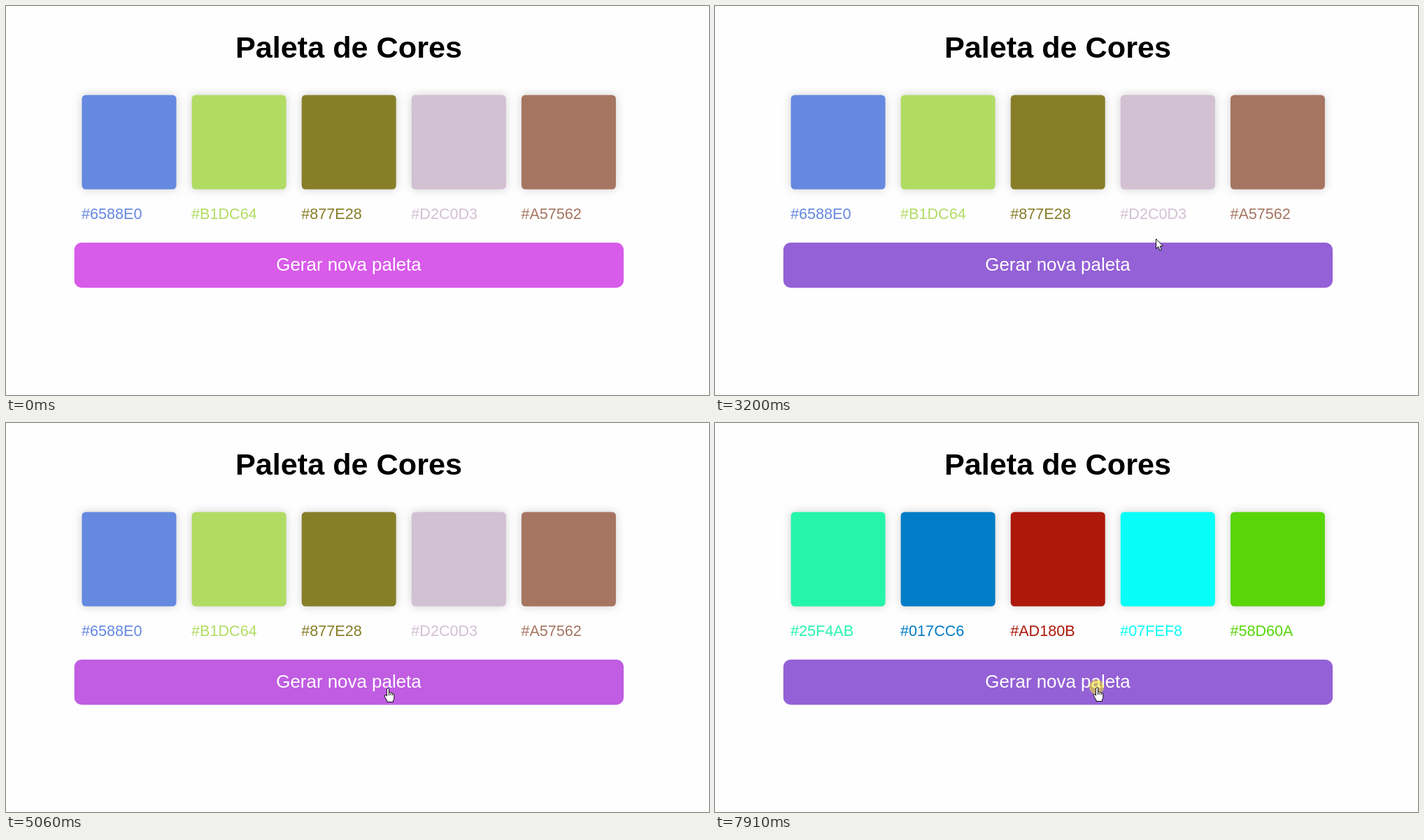
An HTML page for the animation above (8000 ms loop, 1005 px wide and 557 px high).

```html
<!DOCTYPE html>
<html lang="pt-BR">
<head>
<meta charset="utf-8">
<title>Paleta de Cores</title>
<style>
  html, body { margin: 0; width: 100%; height: 100%; overflow: hidden; background: #fefefe; }
  svg { display: block; width: 1005px; height: 557px; font-family: "Liberation Sans", Arial, sans-serif; }
  .cursor { fill: #fff; stroke: #111; stroke-width: 1; stroke-linejoin: round; }
</style>
</head>
<body>
<svg viewBox="0 0 1005 557">
  <defs>
    <filter id="shadow" x="-20%" y="-20%" width="140%" height="140%" color-interpolation-filters="sRGB">
      <feDropShadow dx="0" dy="0" stdDeviation="6.5" flood-color="#000" flood-opacity=".18"/>
    </filter>
  </defs>
  <text x="490" y="74" font-size="43.2" font-weight="bold" text-anchor="middle">Paleta de Cores</text>
  <g id="swatches"></g>
  <rect id="button" x="97.7" y="338.7" width="785.3" height="64.8" rx="10.8"/>
  <text x="490" y="379" font-size="25.92" fill="#fff" text-anchor="middle">Gerar nova paleta</text>
  <circle id="click" cx="545.5" cy="378" r="10.5" fill="#ff0" fill-opacity=".47"/>
  <g id="pointer" class="cursor">
    <path id="arrow" d="M.5 .5V14.5L3.7 11.6L6 17L8.4 16L6.1 10.9H10.4Z"/>
    <g id="hand">
      <path d="M-1.5 12V2Q0 -1 1.5 2V7Q3 5.5 4 7.5Q5.5 6.5 6.5 8.5Q8.5 7.5 8.8 10V15Q8.8 17 7.5 18V20.5H-1V19L-4.6 13Q-5.5 10 -3.2 10.5Z"/>
      <path d="M1.5 7V11M4 7.5V11M6.5 8.5V11" fill="none"/>
    </g>
  </g>
</svg>
<script>
const LOOP = 8000, FADE = 400, APPEAR = 1110, CLICK = 7050, NEW_PALETTE = 7250, NEXT_CLICK = 7910;
const BUTTON_TOP = 339, PINK = [216, 91, 233], PURPLE = [148, 97, 214];
const palettes = [
  ['#6588E0', '#B1DC64', '#877E28', '#D2C0D3', '#A57562'],
  ['#25F4AB', '#017CC6', '#AD180B', '#07FEF8', '#58D60A']
];
// Pointer strokes: the time each begins and ends, and where it leads; it rests in between
const strokes = [
  { from: 1110, to: 1180, x: 994, y: 548 },
  { from: 1390, to: 1920, x: 827, y: 471 },
  { from: 2310, to: 2380, x: 806, y: 453 },
  { from: 2380, to: 3200, x: 630, y: 333 },
  { from: 3200, to: 3780, x: 546, y: 390 },
  { from: 3780, to: 3890, x: 544, y: 441 },
  { from: 3890, to: 4240, x: 545, y: 483 },
  { from: 4570, to: 5060, x: 546, y: 379 },
  { from: 5540, to: 5950, x: 544, y: 446 },
  { from: 6170, to: 6350, x: 545, y: 403 },
  { from: 6350, to: 6650, x: 546, y: 378 }
];
const hovers = [[2700, 3810], [4970, 5690], [6350, LOOP]];

const $ = id => document.getElementById(id);
const clamp = k => Math.min(1, Math.max(0, k));
const mix = (a, b, k) => a + (b - a) * k;
const show = (el, on) => el.setAttribute('visibility', on ? 'visible' : 'hidden');

function svg(tag, attrs) {
  const el = document.createElementNS('http://www.w3.org/2000/svg', tag);
  for (const name in attrs) el.setAttribute(name, attrs[name]);
  return $('swatches').appendChild(el);
}

const swatches = palettes[0].map((_, i) => {
  const x = 108.5 + 157.1 * i;
  return {
    box: svg('rect', { x, y: 127.5, width: 135, height: 135, rx: 5.4, filter: 'url(#shadow)' }),
    label: svg('text', { x: x - .5, y: 304.5, 'font-size': 21.6 })
  };
});

// CSS "ease": cubic-bezier(.25, .1, .25, 1)
function ease(x) {
  const bezier = (a, b, s) => 3 * a * s * (1 - s) ** 2 + 3 * b * s * s * (1 - s) + s ** 3;
  let low = 0, high = 1;
  for (let i = 0; i < 20; i++) {
    const mid = (low + high) / 2;
    if (bezier(.25, .25, mid) < x) low = mid; else high = mid;
  }
  return bezier(.1, 1, low);
}

function pointerAt(t) {
  let x = 979, y = 541;
  for (const stroke of strokes) {
    const k = clamp((t - stroke.from) / (stroke.to - stroke.from));
    x = mix(x, stroke.x, k);
    y = mix(y, stroke.y, k);
  }
  return [Math.round(x), Math.round(y)];
}

function draw(t) {
  const [x, y] = pointerAt(t);
  const fade = start => ease(clamp((t - start) / FADE));
  const hover = hovers.reduce((sum, [enter, leave]) => sum + fade(enter) - fade(leave), 0);
  const over = y >= BUTTON_TOP && hovers.some(([enter, leave]) => t >= enter && t < leave);

  palettes[t < NEW_PALETTE ? 0 : 1].forEach((color, i) => {
    const { box, label } = swatches[i];
    box.setAttribute('fill', color);
    label.setAttribute('fill', color);
    label.textContent = color;
  });
  $('button').setAttribute('fill', `rgb(${PINK.map((c, i) => Math.round(mix(c, PURPLE[i], hover)))})`);
  $('pointer').setAttribute('transform', `translate(${x} ${y})`);
  show($('arrow'), t >= APPEAR && !over);
  show($('hand'), over);
  show($('click'), (t >= CLICK && t < NEW_PALETTE) || t >= NEXT_CLICK);
}

const begin = performance.now();
function tick() {
  draw((performance.now() - begin) % LOOP);
  requestAnimationFrame(tick);
}
tick();
</script>
</body>
</html>
```
